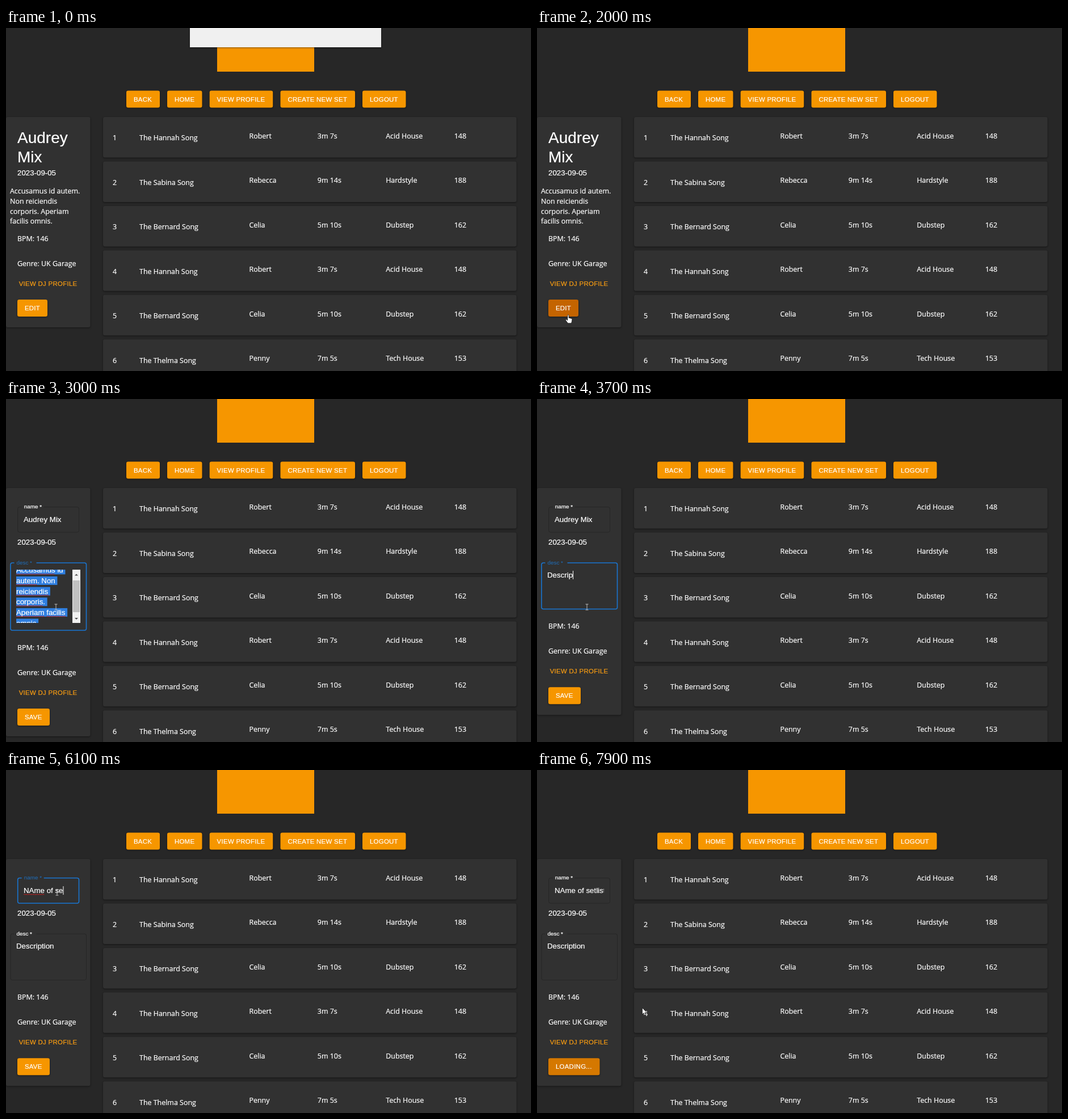
An HTML page for the animation above (8000 ms loop, 925x605 px).

```html
<!DOCTYPE html>
<html lang="en">
<head>
<meta charset="utf-8">
<title>Set editor</title>
<style>
  html, body { margin: 0; width: 100%; height: 100%; overflow: hidden; background: #272727; }
  svg { display: block; }
  text { font: 13.3px "Liberation Sans", Arial, sans-serif; fill: #fff; stroke: #fff; stroke-width: .22px; white-space: pre; }
  .body { font: 12.45px "Open Sans", "Noto Sans", sans-serif; }
  .title { font-size: 28px; }
  .label { font-size: 9.9px; }
  .button { font-size: 11.4px; letter-spacing: .31px; }
  .link { fill: #f99d12; stroke: #f99d12; }
  .focus { fill: #1f6fbd; stroke: none; }
  .raised { filter: drop-shadow(0 1px 1.5px #0007); }
</style>
</head>
<body>
<svg width="925" height="605" viewBox="0 0 925 605">
  <defs>
    <clipPath id="nameClip"><rect x="31" y="195" width="86.8" height="36"/></clipPath>
    <clipPath id="descClip"><rect x="17" y="301" width="100" height="94"/></clipPath>
  </defs>
  <g id="page"></g>
  <g id="live"></g>
</svg>
<script>
const ORANGE = '#f69600', DARK = '#c46400', CARD = '#313131', BLUE = '#1976d2';
const NAME = 'Audrey Mix', NEW_NAME = 'NAme of setlist', NEW_DESC = 'Description';
const LOOP = 8000, STEP = 100;

// Moments of the story, in ms
const POPUP_GONE = 1600, EDIT = 2100, DESC_FOCUS = 2500, DESC_SELECT = 3000, DESC_TYPE = 3200,
  NAME_FOCUS = 5000, NAME_SELECT = 5400, NAME_TYPE = 5500, NAME_BLUR = 7600, LOADING = 7800;

const pen = document.createElement('canvas').getContext('2d');
pen.font = '13.3px "Liberation Sans", Arial, sans-serif';
const width = s => pen.measureText(s).width;

const text = (x, y, s, kind = '') => `<text x="${x}" y="${y}" class="${kind}">${s}</text>`;
const rect = (x, y, w, h, fill, more = '') =>
  `<rect x="${x}" y="${y}" width="${w}" height="${h}" fill="${fill}" ${more}/>`;
const card = (x, y, w, h) => rect(x, y, w, h, CARD, 'rx="3.3" class="raised"');
const button = (x, y, w, label, fill = ORANGE) =>
  rect(x, y, w, 30, fill, 'rx="3.3" class="raised"') + text(x + 12.9, y + 19.1, label, 'button');
const mark = (x, y, s) => rect(x, y - 12, width(s), 15, '#2f7fe0');
// The caret blinks from the last input on
const caret = (x, y, idle) => idle % 1000 < 500 ? rect(x, y - 12, 1, 15, '#fff') : '';

function squiggle(x, y, s) {
  const waves = 'l1.3 -1.3l1.3 1.3'.repeat(Math.round(width(s) / 2.6));
  return `<path d="M${x} ${y + 3.2}${waves}" fill="none" stroke="#e02020" stroke-width=".9"/>`;
}

function field(x, y, w, h, label, inset, on, hover) {
  const edge = on ? BLUE : hover ? '#0b0b0b' : '#262626';
  return rect(x, y, w, h, 'none', `rx="3.3" stroke="${edge}" stroke-width="${on ? 1.6 : 1}"`) +
    rect(x + inset - 4, y - 2, 39, 4, CARD) +
    text(x + inset, y + 2.8, label, 'label ' + (on ? 'focus' : ''));
}

// Header and track list
const songs = [
  ['The Hannah Song', 'Robert', '3m 7s', 'Acid House', 148],
  ['The Sabina Song', 'Rebecca', '9m 14s', 'Hardstyle', 188],
  ['The Bernard Song', 'Celia', '5m 10s', 'Dubstep', 162],
  ['The Thelma Song', 'Penny', '7m 5s', 'Tech House', 153]
];
const columns = [235, 428.5, 548.8, 669.2, 789.7];
page.innerHTML =
  rect(372, -94, 171, 171, ORANGE) +
  [[212, 59, 'BACK'], [284, 61.5, 'HOME'], [358.7, 111.5, 'VIEW PROFILE'],
   [483.5, 131.5, 'CREATE NEW SET'], [628, 76.5, 'LOGOUT']]
    .map(([x, w, s]) => button(x, 110.5, w, s)).join('') +
  [0, 1, 2, 0, 2, 3].map((song, i) => {
    const y = 157 + 78.45 * i;
    return card(171, y, 728.5, 71.5) + text(188, y + 41.3, i + 1, 'body') +
      songs[song].map((s, c) => text(columns[c], y + (c ? 38 : 41.3), s, 'body')).join('');
  }).join('');

// Pointer: time, x, y
const path = [
  [100, 837, 77], [200, 301, 250], [300, 507, 379], [400, 507, 379], [1000, 218, 171],
  [1200, 218, 171], [1800, 55, 506], [EDIT, 55, 506], [2500, 88, 367], [4400, 88, 367],
  [4900, 90, 216], [6800, 90, 216], [7300, 52, 531], [7700, 52, 531], [7900, 185.5, 419.5]
];
function pointerAt(t) {
  const i = path.findIndex(p => p[0] >= t);
  if (i < 1) return path[i < 0 ? path.length - 1 : 0].slice(1);
  const [a, b] = [path[i - 1], path[i]], k = (t - a[0]) / (b[0] - a[0]);
  const ease = k * k * (3 - 2 * k);
  return [1, 2].map(n => a[n] + (b[n] - a[n]) * ease);
}
const shapes = {
  arrow: 'd="M0 0v11.5l2.7-2.4 1.8 4 1.9-.8-1.8-3.9h3.6z" fill="#fff" stroke="#111" stroke-width=".7"',
  hand: 'd="M-1.1 .6q1.1-1.6 2.2 0v4.6l4.6 1.2q1.4.4 1.2 2l-.7 4.2-.9 2.2h-5.8l-4.3-5.8q.5-1.7 2.1-.7l1.6 1.4z" fill="#fff" stroke="#111" stroke-width=".7"',
  beam: 'd="M-2.5-5h5M0-5v10M-2.5 5h5" fill="none" stroke="#bbb"'
};

function viewPanel() {
  const lines = ['Accusamus id autem.', 'Non reiciendis', 'corporis. Aperiam', 'facilis omnis.'];
  return NAME.split(' ').map((s, i) => text(20, 203 + 33.5 * i, s, 'title')).join('') +
    text(20, 259.5, '2023-09-05') +
    lines.map((s, i) => text(7, 292.3 + 17.7 * i, s, 'body')).join('');
}

// Typed in two bursts, with a short rest after the first word
const nameLength = t => t < 5900
  ? Math.min(4, Math.floor((t - NAME_SELECT) / 75))
  : Math.min(NEW_NAME.length, Math.round(6 + (t - 5900) * .019));

function nameField(t, hover) {
  const on = t >= NAME_FOCUS && t < NAME_BLUR, y = 217;
  const picked = t >= NAME_SELECT && t < NAME_TYPE;
  const s = t < NAME_TYPE ? NAME : NEW_NAME.slice(0, nameLength(t));
  const x = 31 - (on ? Math.max(0, width(s) - 86) : 0);
  const idle = t < NAME_TYPE ? t - NAME_FOCUS : Math.max(0, t - 6400);
  return field(20.7, 190.5, 107.8, 44.5, 'name *', 11, on, hover) + '<g clip-path="url(#nameClip)">' +
    (picked ? mark(x, y, s) : '') + text(x, y, s) +
    (on && s.startsWith('NAme ') ? squiggle(x, y, 'NAme') : '') +
    (on && !picked ? caret(x + width(s), y, idle) : '') + '</g>';
}

function oldDesc(t, on) {
  const lines = ['Accusamus id ', 'autem. Non ', 'reiciendis ', 'corporis. ', 'Aperiam facilis ', 'omnis.'];
  const x = 18, top = on ? 306.3 : 315, picked = t >= DESC_SELECT;
  const body = lines.map((s, i) => {
    const y = top + 18.65 * i;
    const wavy = on ? [...s.matchAll(/[a-z]{5,}/gi)]
      .map(m => squiggle(x + width(s.slice(0, m.index)), y, m[0])).join('') : '';
    return (picked ? mark(x, y, s) : '') + text(x, y, s) + wavy +
      (on && !picked && i == 3 ? caret(x + width(s), y, 0) : '');
  }).join('');
  return `<g clip-path="url(#descClip)">${body}</g>` +
    rect(117, 301, 14, 94, '#f1f1f1') + rect(118, on ? 320 : 315, 12, 56, '#c1c1c1') +
    '<path d="M121 311.5h6l-3-3zM121 386h6l-3 3z" fill="#505050"/>';
}

function descField(t, hover) {
  const on = t >= DESC_FOCUS && t < NAME_FOCUS, tall = t < DESC_TYPE;
  const frame = field(8, 289, 133.5, tall ? 119 : 81.5, 'desc *', 10.5, on, hover);
  if (tall) return frame + oldDesc(t, on);
  const s = NEW_DESC.slice(0, Math.round(1 + (t - DESC_TYPE) / 80));
  return frame + text(18, 315, s) + (on ? caret(18 + width(s), 315, Math.max(0, t - 4000)) : '');
}

function draw(t) {
  const editing = t >= EDIT, loading = t >= LOADING;
  const shift = !editing ? -29.2 : t < DESC_TYPE ? 37.7 : 0;
  const [x, y] = pointerAt(t), buttonY = 508.3 + shift;
  const [label, w] = !editing ? ['EDIT', 53] : loading ? ['LOADING...', 90.5] : ['SAVE', 57];
  const inside = (l, top, r, b) => x >= l && x <= r && y >= top && y <= b;
  const overButton = inside(20, buttonY, 20 + w, buttonY + 30);
  const overLink = inside(20, 470 + shift, 129, 495 + shift);
  const overName = editing && inside(20, 190, 129, 235);
  const overDesc = editing && inside(8, 289, 142, t < DESC_TYPE ? 408 : 370);
  const fading = t == EDIT + STEP || t == LOADING + STEP;
  const fill = fading ? '#d57800' : overButton || t == EDIT || loading ? DARK : ORANGE;
  const shape = overButton || overLink ? 'hand' : overName || overDesc ? 'beam' : 'arrow';

  live.innerHTML =
    (t < POPUP_GONE ? rect(324, -10, 337, 44, '#f0f0f0', 'class="raised"') : '') +
    card(0, 157, 148.5, 400.3 + shift) +
    (editing ? nameField(t, overName) + text(20, 256.5, '2023-09-05') + descField(t, overDesc) : viewPanel()) +
    text(20, 405 + shift, 'BPM: 146', 'body') +
    text(20, 449 + shift, 'Genre: UK Garage', 'body') +
    text(22.7, 484.2 + shift, 'VIEW DJ PROFILE', 'button link') +
    button(20, buttonY, w, label, fill) +
    (t >= 100 ? `<path transform="translate(${x} ${y})" ${shapes[shape]}/>` : '');
}

const start = performance.now();
let shown = -1;
function tick() {
  const t = Math.floor((performance.now() - start) % LOOP / STEP) * STEP;
  if (t != shown) draw(shown = t);
  requestAnimationFrame(tick);
}
tick();
</script>
</body>
</html>
```
